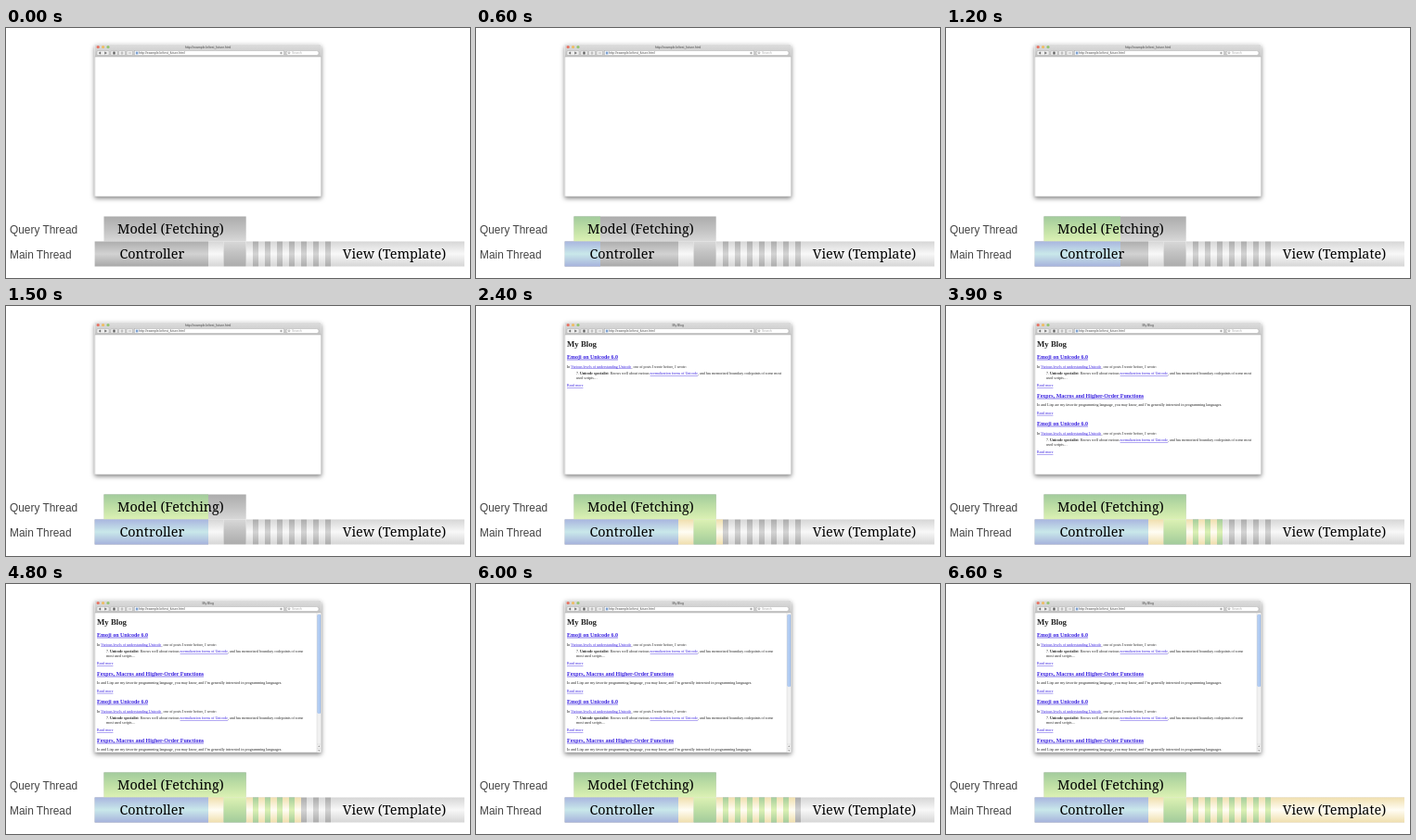
Animation of 500 by 270 pixels, one loop 8000 ms. Source, as an HTML page:

```html
<!DOCTYPE html>
<html lang="en">
<head>
<meta charset="utf-8">
<title>Threaded rendering</title>
<style>
  html, body { margin: 0; width: 100%; height: 100%; overflow: hidden; background: #fff; }
  svg { display: block; width: 500px; height: 270px; }
  .sans { font-family: "Liberation Sans", Arial, sans-serif; }
  .page { font: 4px "Liberation Serif", Times, serif; fill: #222; }
  .head { font-weight: bold; }
  .link { fill: #3a22e0; text-decoration: underline .4px; }
  .label { font: 14.35px "Noto Serif", serif; fill: #000; }
</style>
</head>
<body>
<svg viewBox="0 0 500 270">
  <defs>
    <linearGradient id="chrome" x2="0" y2="1">
      <stop stop-color="#dedede"/><stop offset="1" stop-color="#c4c4c4"/>
    </linearGradient>
    <linearGradient id="thumbFill">
      <stop stop-color="#86ace6"/><stop offset=".45" stop-color="#c8ddfa"/><stop offset="1" stop-color="#80a6e0"/>
    </linearGradient>
    <filter id="shadow" x="-10%" y="-10%" width="120%" height="125%">
      <feDropShadow dx="0" dy="2" stdDeviation="2.8" flood-opacity=".5"/>
    </filter>
    <clipPath id="view"><rect x="96" y="31" width="243.500" height="151"/></clipPath>
    <clipPath id="done"><rect id="progress" x="95" y="200" height="60"/></clipPath>
    <g id="fades"></g>
  </defs>

  <path d="M95.500 182V20.500q0-3 3-3H336.800q3 0 3 3V182z" fill="#fff" filter="url(#shadow)"/>
  <path d="M95.500 31V20.500q0-3 3-3H336.800q3 0 3 3V31z" fill="url(#chrome)"/>
  <path d="M95.500 31H339.800" stroke="#999" stroke-width=".4"/>
  <path d="M95.800 31V182H339.500V31" fill="none" stroke="#bbb" stroke-width=".6"/>
  <circle cx="99.200" cy="20.500" r="1.600" fill="#e8705f"/>
  <circle cx="104.600" cy="20.500" r="1.600" fill="#efbc60"/>
  <circle cx="110" cy="20.500" r="1.600" fill="#92c470"/>
  <g fill="#eee" stroke="#a2a2a2" stroke-width=".4">
    <rect x="98" y="24.500" width="13" height="5" rx="1"/>
    <rect x="113" y="24.500" width="7" height="5" rx="1"/>
    <rect x="121.500" y="24.500" width="7" height="5" rx="1"/>
    <rect x="130" y="24.500" width="6.500" height="5" rx="1"/>
    <rect x="138.500" y="24.500" width="161" height="5" fill="#fff"/>
    <rect x="302" y="24.500" width="35" height="5" rx="2.500" fill="#fff"/>
  </g>
  <path d="M102 25.800l-2 1.200 2 1.200zM106.500 25.800l2 1.200-2 1.200zM115.500 25.800h2v2.500h-2zM125 25.300v3.500M123.500 27h3M132 27h3" fill="#666" stroke="#666" stroke-width=".4"/>
  <rect x="139.800" y="25.600" width="2.600" height="2.800" fill="#7b9fd0"/>
  <circle cx="296.500" cy="27" r="1.200" fill="#aaa"/>
  <circle cx="305" cy="26.800" r="1" fill="none" stroke="#777" stroke-width=".5"/>
  <g class="sans" font-size="3.4" fill="#444">
    <text id="title" x="217.700" y="21.800" text-anchor="middle"></text>
    <text x="143.300" y="28.200">http://example.kr/test_future.html</text>
    <text x="308" y="28.200" fill="#aaa">Search</text>
  </g>

  <g clip-path="url(#view)">
    <text id="heading" class="page head" x="98" y="43.800" style="font-size:8.8px">My Blog</text>
    <g id="posts" class="page"></g>
    <g id="scroll">
      <rect x="335" y="31" width="4.500" height="151" fill="#f1f1f1"/>
      <path d="M335 31V182" stroke="#ccc" stroke-width=".4"/>
      <rect id="thumb" x="335.600" y="32.500" width="3.500" rx="1.750" fill="url(#thumbFill)"/>
      <path d="M335 173h4.500M335 177.500h4.500" stroke="#ccc" stroke-width=".4"/>
      <path d="M337.300 174.200l1 1.800h-2zM337.300 181l1-1.800h-2z" fill="#999"/>
    </g>
  </g>

  <g id="idle"></g>
  <g id="active" clip-path="url(#done)"></g>
  <g class="label">
    <text x="120" y="222.300">Model (Fetching)</text>
    <text x="122.500" y="249.300">Controller</text>
    <text x="362.800" y="249.300">View (Template)</text>
  </g>
  <g class="sans" font-size="11.9" fill="#444">
    <text x="4" y="221.700">Query Thread</text>
    <text x="4" y="249">Main Thread</text>
  </g>
</svg>
<script>
const $ = id => document.getElementById(id);
const STEP = 300, LOOP = 8000;
const EDGES = [95, 106, 134, 160, 188, 218, 234, 259];

// Vertical gradients: [idle stops, active stops]
const FADES = {
  control: [['#adadad', '#d2d2d2', '#a8a8a8'], ['#a9b6df', '#c9e8ea', '#a6b2dc']],
  model: [['#acacac', '#c0c0c0', '#d8d8d8'], ['#a2cb9c', '#bfdfa5', '#dcf1b4']],
  column: [['#d8d8d8', '#c0c0c0', '#acacac'], ['#dcf1b4', '#bfdfa5', '#a2cb9c']],
  stripe: [['#acacac', '#d4d4d4', '#acacac'], ['#a6cd9c', '#dcf1b4', '#a6cd9c']],
  render: [['#d6d6d6', '#f8f8f8', '#d6d6d6'], ['#f0dfae', '#fffdf4', '#f0dfae']]
};
for (const [name, sets] of Object.entries(FADES))
  sets.forEach((stops, k) => $('fades').innerHTML +=
    `<linearGradient id="${name}${k}" x2="0" y2="1">` +
    stops.map((c, j) => `<stop offset="${j / 2}" stop-color="${c}"/>`).join('') + '</linearGradient>');

// Bars: [fade, left, right, top]
const MODEL_Y = 203.5, MAIN_Y = 230.5;
const bars = [['model', 105.5, 258.7, MODEL_Y], ['control', 95.6, 218, MAIN_Y],
  ['render', 218, 234.5, MAIN_Y], ['column', 234.5, 258.7, MAIN_Y]];
for (let j = 0; j < 7; j++) {
  const x = 259 + 13 * j;
  bars.push(['render', x, x + 7, MAIN_Y], ['stripe', x + 7, x + 13, MAIN_Y]);
}
bars.push(['render', 350, 494, MAIN_Y]);
['idle', 'active'].forEach((id, k) => $(id).innerHTML = bars.map(([fade, x, end, y]) =>
  `<rect x="${x}" y="${y}" width="${end - x}" height="27" fill="url(#${fade}${k})"/>`).join(''));

const link = s => `<tspan class="link">${s}</tspan>`;
const line = (x, y, s) => `<text x="${x}" y="${y}">${s}</text>`;
const title = (y, s) => `<text class="head link" x="98" y="${y}" style="font-size:6px">${s}</text>`;

function post(k, narrow) {
  const y = 56.7 + 72 * (k >> 1) + 42 * (k % 2);
  if (k % 2) return title(y, 'Fexprs, Macros and Higher-Order Functions') +
    line(98, y + 9.7, 'Io and Lisp are my favorite programming language, you may know, and I’m generally interested in programming languages.') +
    line(98, y + 18.2, link('Read more'));
  return title(y, 'Emoji on Unicode 6.0') +
    line(98, y + 9.9, `In ${link('Various levels of understanding Unicode')}, one of posts I wrote before, I wrote:`) +
    line(108, y + 17.7, `7. <tspan class="head">Unicode specialist</tspan>: Knows well about various ` +
      `${link('normalization forms of Unicode')}, and has memorized boundary codepoints of some${narrow ? '' : ' most'}`) +
    line(108, y + 22.5, `${narrow ? 'most ' : ''}used scripts…`) +
    line(98, y + 30.6, link('Read more'));
}

let shown = -1;
function draw(now) {
  const i = Math.min(22, Math.floor(now % LOOP / STEP));
  if (i !== shown) {
    shown = i;
    const edge = i < 8 ? EDGES[i] : i < 22 ? Math.floor(266 + 6.5 * (i - 8)) : 494;
    const count = Math.max(0, Math.min(7, Math.floor(i / 2) - 3));
    const started = i >= 6, scrolls = count > 3;
    $('progress').setAttribute('width', edge - 95);
    $('title').textContent = started ? 'My Blog' : 'http://example.kr/test_future.html';
    $('heading').style.display = started ? '' : 'none';
    $('posts').innerHTML = Array.from({ length: count }, (_, k) => post(k, scrolls)).join('');
    $('scroll').style.display = scrolls ? '' : 'none';
    $('thumb').setAttribute('height', 140 * 150 / (15 + 36 * count));
  }
  requestAnimationFrame(() => draw(performance.now()));
}
draw(performance.now());
</script>
</body>
</html>
```
